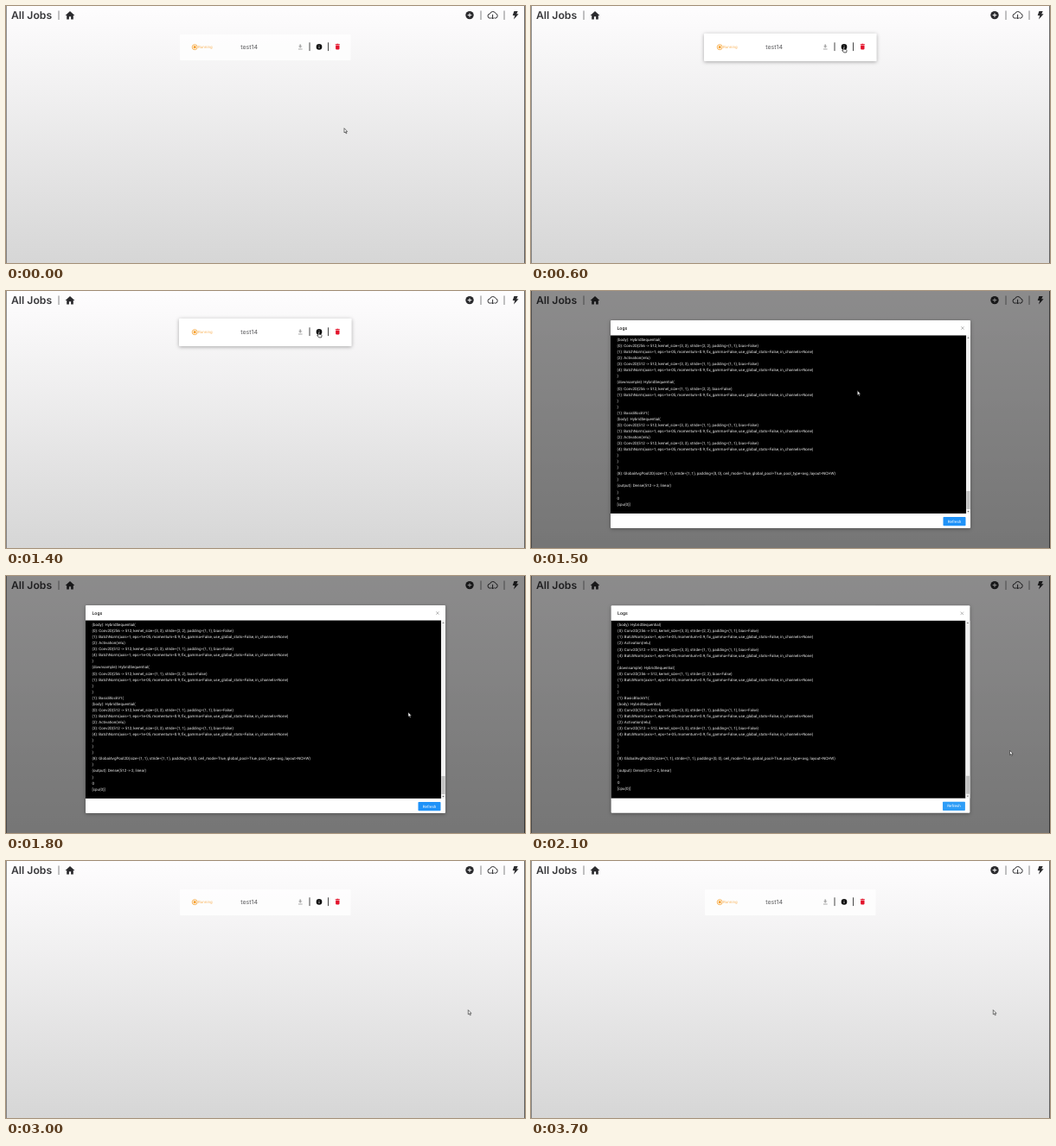
An HTML page for the animation above (8 s loop, 600 px wide and 298 px high).

```html
<!DOCTYPE html>
<html lang="en">
<head>
<meta charset="utf-8">
<title>All Jobs</title>
<style>
  html, body { margin: 0; width: 100%; height: 100%; overflow: hidden; background: #fff; }
  svg { display: block; width: 100vw; height: 100vh; }
  text { text-rendering: geometricPrecision; white-space: pre; }
  .ui { font-family: Inter, "Open Sans", sans-serif; }
  .log { font-family: Roboto, Arial, sans-serif; }
  .shadow { filter: drop-shadow(0 1px 2px rgba(0, 0, 0, .32)); }
</style>
</head>
<body>
<svg viewBox="0 0 600 298" preserveAspectRatio="none">
  <defs>
    <linearGradient id="sky" x2="0" y2="1">
      <stop stop-color="#fefdfe"/>
      <stop offset="1" stop-color="#d6d6d6"/>
    </linearGradient>
  </defs>
  <rect width="600" height="298" fill="url(#sky)"/>

  <!-- Toolbar -->
  <g class="ui" fill="#2b2b2e">
    <text x="6" y="15" font-size="12.2" font-weight="600" fill="#38383b">All Jobs</text>
    <path d="M61 5.5v10.5M549 5.5v10.5M576 5.5v10.5" stroke="#77777a" stroke-width=".9"/>
    <path d="M74 6 68.6 11h1.6v4.4h2.7v-3.2h2.2v3.2h2.7V11h1.6z"/>
    <circle cx="536" cy="10.6" r="4.7"/>
    <path d="M536 8.3v4.6M533.7 10.6h4.6" stroke="#fff" stroke-width="1"/>
    <path d="M560.6 14.2h-.8a2.6 2.6 0 0 1-.3-5.2 3.5 3.5 0 0 1 6.6-.3 2.8 2.8 0 0 1-.4 5.5h-.9M562.6 9.8v5M560.9 13.3l1.7 1.7 1.7-1.7"
          fill="none" stroke="#2b2b2e" stroke-width="1"/>
    <path d="M587.4 6h4.3l-1.5 3.2h2.4l-5.6 6.2 1.2-4.4h-2.5z"/>
  </g>

  <!-- Job card -->
  <rect x="201" y="33" width="197.5" height="30" rx="1" fill="#fff" opacity=".8"/>
  <g id="raised" class="shadow" opacity="0">
    <rect x="200" y="31.8" width="199.6" height="32.2" rx="1" fill="#fff"/>
  </g>
  <g class="ui">
    <circle cx="218.2" cy="47.7" r="3" fill="none" stroke="#f6a233" stroke-width=".8"/>
    <circle cx="218.2" cy="47.7" r="1.6" fill="#f6a233"/>
    <text x="222" y="49.4" font-size="4.3" fill="#f8b055">Running</text>
    <text x="271.3" y="49.9" font-size="7" fill="#5c5c5e">test14</text>
    <path d="M339.4 44.5h1.7v2h1.4l-2.3 2.3-2.2-2.3h1.4zM337.9 49.6h4.7v.9h-4.7z" fill="#a9a9a9"/>
    <path d="M351 42.3v9.8M372.5 42.3v9.8" stroke="#333" stroke-width=".9"/>
    <circle cx="362" cy="47.4" r="3.3" fill="#0c0c0c"/>
    <path d="M362 45.5v.8M362 47v2.2" stroke="#fff" stroke-width=".7"/>
    <path d="M381.1 45.5h4.4v4.1q0 .8-.8.8h-2.8q-.8 0-.8-.8zM380.7 44.3h1.4l.5-.5h1.4l.5.5h1.4v.8h-5.2z" fill="#e3142c"/>
  </g>

  <path d="M.3 0v298" stroke="#555" stroke-width=".8"/>
  <path d="M599.6 0v298" stroke="#333" stroke-width=".8"/>

  <!-- Log dialog -->
  <g id="dialog" visibility="hidden">
    <rect width="600" height="298" fill="#000" opacity=".45"/>
    <g id="panel">
      <g class="shadow"><rect x="92" y="34" width="416" height="241" rx="1" fill="#fff"/></g>
      <text class="log" x="99.5" y="44.8" font-size="5.3" font-weight="500" fill="#222">Logs</text>
      <path d="m497.2 41.3 3.4 3.4m0-3.4-3.4 3.4" stroke="#888" stroke-width=".6"/>
      <rect x="92" y="51.5" width="411" height="206.5" fill="#000"/>
      <rect x="503" y="51.5" width="5" height="206.5" fill="#f1f1f1"/>
      <rect x="503.4" y="232" width="4.2" height="21" fill="#c1c1c1"/>
      <path d="m504.3 54.8 1.2-1.4 1.2 1.4zM504.3 255l1.2 1.4 1.2-1.4z" fill="#666"/>
      <g id="lines" class="log" font-size="4.49" fill="#eee"></g>
      <rect id="button" x="476.5" y="262" width="26" height="10.3" rx=".8"/>
      <text class="log" x="489.5" y="268.7" font-size="4.5" text-anchor="middle" fill="#fff">Refresh</text>
    </g>
  </g>

  <g id="pointer">
    <path id="arrow" d="M0 0v5.2l1.2-1 .9 2 .9-.4-.9-1.9h1.6z" fill="#fff" stroke="#222" stroke-width=".6"/>
    <path id="hand" d="M-.6.6q.6-.9 1.2 0v2l2.4.6q.6.3.5 1L3 6.3H.2L-1.9 4q.1-.9 1.3-.2z"
          fill="#fff" stroke="#111" stroke-width=".7"/>
  </g>
</svg>
<script>
const LOOP = 8000, STEP = 100;
const OPEN = 1500, CLOSE = 2200;
const byId = id => document.getElementById(id);
const [raised, dialog, panel, lines, button, pointer, arrow, hand] =
  ['raised', 'dialog', 'panel', 'lines', 'button', 'pointer', 'arrow', 'hand'].map(byId);

// Log contents
const conv = (n, from, kernel, stride, pad = ', padding=(1, 1)') =>
  `(${n}): Conv2D(${from} -> 512, kernel_size=(${kernel}, ${kernel}), stride=(${stride}, ${stride})${pad}, bias=False)`;
const norm = n =>
  `(${n}): BatchNorm(axis=1, eps=1e-05, momentum=0.9, fix_gamma=False, use_global_stats=False, in_channels=None)`;
const body = (from, stride) => [
  '(body): HybridSequential(', conv(0, from, 3, stride), norm(1),
  '(2): Activation(relu)', conv(3, 512, 3, 1), norm(4), ')'
];
const log = [
  ...body(256, 2),
  '(downsample): HybridSequential(', conv(0, 256, 1, 2, ''), norm(1), ')', ')',
  '(1): BasicBlockV1(', ...body(512, 1), ')', ')',
  '(8): GlobalAvgPool2D(size=(1, 1), stride=(1, 1), padding=(0, 0), ceil_mode=True, global_pool=True, pool_type=avg, layout=NCHW)',
  ')', '(output): Dense(512 -> 2, linear)', ')', '0', '[cpu(0)]'
];
log.forEach((line, i) => {
  const text = document.createElementNS('http://www.w3.org/2000/svg', 'text');
  text.setAttribute('x', 99.5);
  text.setAttribute('y', 58.1 + i * 7.056);
  text.textContent = line;
  lines.append(text);
});

// Pointer path: time, x, y
const path = [
  [0, 391, 141.7], [200, 384, 117], [400, 367, 64], [600, 361.6, 47.6], [1400, 361.6, 47.6],
  [1500, 377.3, 115.5], [1800, 465, 158], [2100, 553.5, 202.3],
  [2200, 538.8, 177.3], [2500, 534.3, 172.7], [LOOP, 534.3, 172.7]
];
const clamp = v => Math.min(1, Math.max(0, v));

function pointerAt(t) {
  const i = path.findIndex(p => p[0] > t);
  const [t0, x0, y0] = path[i - 1], [t1, x1, y1] = path[i];
  const k = (t - t0) / (t1 - t0);
  return [x0 + (x1 - x0) * k, y0 + (y1 - y0) * k];
}

const show = (el, on) => el.setAttribute('visibility', on ? 'visible' : 'hidden');

function draw(time) {
  const t = Math.floor((time % LOOP) / STEP) * STEP;
  const open = t >= OPEN && t < CLOSE;
  const onInfo = t >= 500 && t < OPEN;
  const scale = t === CLOSE - STEP ? 0.997 : 1;

  raised.setAttribute('opacity', t < OPEN ? clamp((t - 300) / 300) : 0);
  show(dialog, open);
  panel.setAttribute('transform', `translate(300 154.5) scale(${scale}) translate(-300 -154.5)`);
  button.setAttribute('fill', scale < 1 ? '#2e9df7' : '#1f92f8');
  pointer.setAttribute('transform', `translate(${pointerAt(t)})`);
  show(arrow, !onInfo);
  show(hand, onInfo);
}

const start = performance.now();
function tick() {
  draw(performance.now() - start);
  requestAnimationFrame(tick);
}
tick();
</script>
</body>
</html>
```
